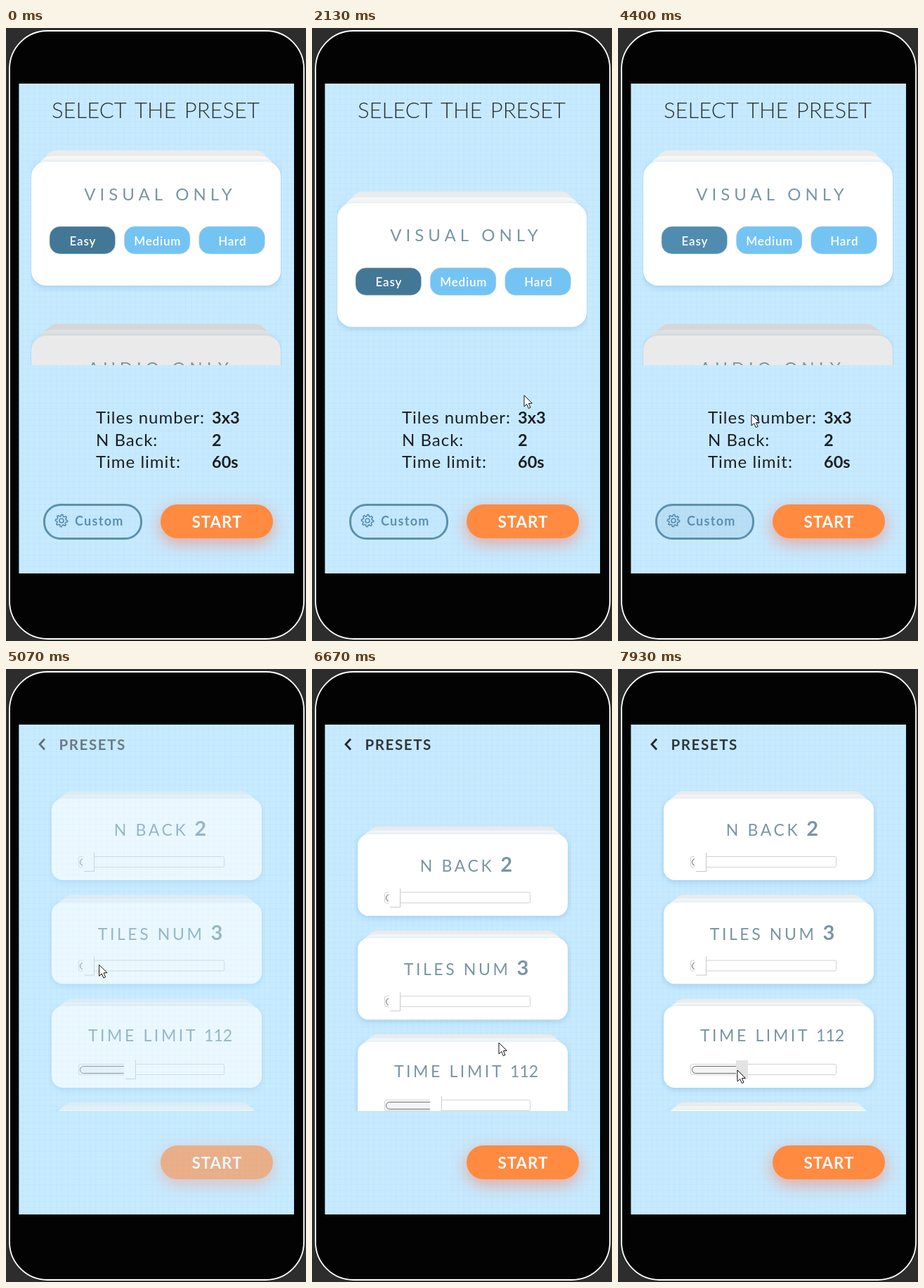
Write an HTML page with a canvas that moves like this. It is 427 by 871 pixels and loops after 8 s.

```html
<!DOCTYPE html>
<html lang="en">
<head>
<meta charset="utf-8">
<title>Preset picker</title>
<style>
  html, body { margin: 0; width: 100%; height: 100%; overflow: hidden; background: #2d2d2d; }
  canvas { display: block; width: 427px; height: 871px; }
</style>
</head>
<body>
<canvas id="stage"></canvas>
<script>
const LOOP = 8000, STEP = 1000 / 15;
const canvas = document.getElementById('stage');
const ctx = canvas.getContext('2d');
const ratio = window.devicePixelRatio || 1;
canvas.width = 427 * ratio;
canvas.height = 871 * ratio;

const FAMILY = 'Lato, "Open Sans", sans-serif';
const LABEL = '#7896a5', STEEL = '#5b90b0', INK = '#1c1f22';
const LIGHT_BUTTON = [116, 196, 243], DARK_BUTTON = [67, 119, 150];

// Places where the hand turns or rests; it eases from one to the next.
const pointerStops = [
  { t: 800, x: 400, y: 696 },
  { t: 1670, x: 315, y: 278 },
  { t: 2270, x: 300, y: 559 },
  { t: 2930, x: 231, y: 309 },
  { t: 3530, x: 118, y: 302 },
  { t: 4130, x: 130, y: 694 },
  { t: 4400, x: 190, y: 549 },
  { t: 5200, x: 128, y: 410 },
  { t: 5600, x: 128, y: 308 },
  { t: 6670, x: 266, y: 531 },
  { t: 7670, x: 304, y: 221 },
  { t: 7930, x: 170, y: 570 }
];
const presetDrag = { press: 1386, release: 2300, from: 382 };
const optionDrag = { press: 5200, release: 6800, from: 410 };

function ramp(time, start, end) {
  const k = Math.min(1, Math.max(0, (time - start) / (end - start)));
  return k * k * (3 - 2 * k);
}

function pointerAt(time) {
  let { x, y } = pointerStops[0];
  pointerStops.slice(1).forEach((stop, i) => {
    const k = ramp(time, pointerStops[i].t, stop.t);
    x += (stop.x - pointerStops[i].x) * k;
    y += (stop.y - pointerStops[i].y) * k;
  });
  return { x, y };
}

// The list follows the hand, resists past its top, and springs back on release.
function scrollAt(time, { press, release, from }) {
  if (time < press) return 0;
  const pulled = pointerAt(Math.min(time, release)).y - from;
  const settle = Math.exp(-Math.max(0, time - release) / 90);
  return (pulled > 0 ? pulled * .42 : pulled) * settle;
}

const mix = (a, b, k) => `rgb(${a.map((v, i) => Math.round(v + (b[i] - v) * k))})`;

function box(x, y, w, h, r, fill, stroke, line = 1) {
  ctx.beginPath();
  ctx.roundRect(x, y, w, h, r);
  if (fill) { ctx.fillStyle = fill; ctx.fill(); }
  if (stroke) { ctx.strokeStyle = stroke; ctx.lineWidth = line; ctx.stroke(); }
}

function shadowed(color, blur, offset, draw) {
  ctx.shadowColor = color;
  ctx.shadowBlur = blur * ratio;
  ctx.shadowOffsetY = offset * ratio;
  draw();
  ctx.shadowColor = 'transparent';
}

// Returns the advance width.
function write(text, x, y, size, { weight = 400, color = INK, gap = 0, wordGap = 0, center = false } = {}) {
  ctx.font = `${weight} ${size}px ${FAMILY}`;
  ctx.letterSpacing = gap + 'px';
  ctx.wordSpacing = wordGap + 'px';
  ctx.textAlign = center ? 'center' : 'left';
  ctx.fillStyle = color;
  ctx.fillText(text, x + (center ? gap / 2 : 0), y);
  return ctx.measureText(text).width;
}

function line(points, color, width) {
  ctx.beginPath();
  points.forEach(([x, y]) => ctx.lineTo(x, y));
  ctx.strokeStyle = color;
  ctx.lineWidth = width;
  ctx.stroke();
}

function clipped(x, y, w, h, draw) {
  ctx.save();
  ctx.beginPath();
  ctx.rect(x, y, w, h);
  ctx.clip();
  draw();
  ctx.restore();
}

function phone() {
  ctx.fillStyle = '#2d2d2d';
  ctx.fillRect(0, 0, 427, 871);
  box(5, 4, 419, 864, 54, '#030303', '#fff', 1.8);
}

function paper() {
  ctx.fillStyle = '#c8eaff';
  ctx.fillRect(18, 79, 392, 696);
  ctx.fillStyle = 'rgba(170, 216, 245, .16)';
  for (let x = 23; x < 410; x += 8) ctx.fillRect(x, 79, 2, 696);
  for (let y = 84; y < 775; y += 8) ctx.fillRect(18, y, 392, 2);
}

function startButton() {
  shadowed('rgba(255, 120, 85, .6)', 24, 7, () => box(220, 677, 160, 48, 24, '#ff8a40'));
  write('START', 300, 710, 22.5, { weight: 700, color: '#fff', gap: .9, center: true });
}

function cardStack(x, y, w, h, r, rise, [back, mid, front]) {
  box(x + r * .8, y - rise, w - r * 1.6, 50, r, back);
  box(x + r * .4, y - rise / 2, w - r * .8, 50, r, mid);
  shadowed('rgba(90, 165, 215, .4)', 8, 2, () => box(x, y, w, h, r, front));
}

const WHITE_STACK = ['#ebebeb', '#f8f8f8', '#fff'], GREY_STACK = ['#d6d6d6', '#e1e1e1', '#eaeaea'];

function presetCard(y, title, shades) {
  cardStack(36, y, 355, 176, 21, 16.5, shades ? WHITE_STACK : GREY_STACK);
  write(title, 216.5, y + 54.5, 24, { color: LABEL, gap: 6, center: true });
  ['Easy', 'Medium', 'Hard'].forEach((name, i) => {
    const x = 62 + i * 106.4;
    box(x, y + 92, 93.5, 39, 15, shades ? mix(LIGHT_BUTTON, DARK_BUTTON, shades[i]) : '#b2c7d5', 'rgba(190, 205, 215, .5)');
    write(name, x + 47, y + 118.5, 17, { weight: 600, color: '#fff', gap: .8, center: true });
  });
}

function gear(cx, cy) {
  ctx.beginPath();
  for (let i = 0; i < 32; i++) {
    const r = i % 4 < 2 ? 8.6 : 6.4, a = i * Math.PI / 16;
    ctx.lineTo(cx + r * Math.cos(a), cy + r * Math.sin(a));
  }
  ctx.closePath();
  ctx.strokeStyle = STEEL;
  ctx.lineWidth = 1.7;
  ctx.stroke();
  ctx.beginPath();
  ctx.arc(cx, cy, 3, 0, 7);
  ctx.stroke();
}

function presetScreen(time) {
  write('SELECT THE PRESET', 213, 128, 31, { weight: 300, color: '#2b3237', wordGap: 3, center: true });
  const easy = 1 - ramp(time, 2870, 3130) + .73 * ramp(time, 3500, 3700);
  const medium = ramp(time, 2800, 3070) - ramp(time, 3500, 3700);
  clipped(35, 170, 357, 309, () => {
    const scroll = scrollAt(time, presetDrag);
    presetCard(190 + scroll, 'VISUAL ONLY', [easy, medium, 0]);
    presetCard(437 + scroll, 'AUDIO ONLY');
  });
  const values = medium > .6 ? ['4x4', '2', '90s'] : ['3x3', '2', '60s'];
  ['Tiles number:', 'N Back:', 'Time limit:'].forEach((name, i) => {
    const y = 562 + i * 31.5;
    write(name, 128, y, 24, { gap: 1 });
    write(values[i], 293, y, 23.5, { weight: 700 });
  });
  box(54.5, 677.5, 138, 48, 23, `rgba(81, 139, 174, ${.02 + .1 * ramp(time, 3900, 4100)})`, STEEL, 3);
  gear(79, 700);
  write('Custom', 98, 707, 18, { weight: 700, color: STEEL, gap: 1.3 });
  startButton();
}

function optionCard(y, { label, value, level, big }, pressed) {
  cardStack(65, y, 299, 116, 16, 10.5, WHITE_STACK);
  const base = y + (big ? 53 : 50);
  const labelStyle = { color: LABEL, gap: 3.6 }, valueStyle = { color: LABEL, weight: big ? 700 : 400 };
  const valueSize = big ? 29 : 23, between = 9;
  // Measure both parts off stage, then centre them together.
  const width = write(label, -999, 0, 23, labelStyle) + between + write(value, -999, 0, valueSize, valueStyle);
  const left = 219.5 - width / 2;
  const advance = write(label, left, base, 23, labelStyle);
  write(value, left + advance + between, base, valueSize, valueStyle);

  const thumb = 109 + 190 * level, top = y + 77;
  box(103.5, y + 82.5, 207, 15, 2, '#fff', '#d2d2d2');
  box(105.5, y + 85.5, thumb - 98, 10, 5, '#f4f4f4', '#666');
  ctx.fillStyle = pressed ? '#e3e3e3' : '#fff';
  ctx.fillRect(thumb, top, 17, 27);
  if (!pressed) line([[thumb + 16.5, top], [thumb + 16.5, top + 26.5], [thumb + 2, top + 26.5]], '#c8c8c8', 1);
}

const options = [
  { label: 'N BACK', value: '2', level: 0, big: true },
  { label: 'TILES NUM', value: '3', level: 0, big: true },
  { label: 'TIME LIMIT', value: '112', level: .31 },
  { label: 'TURN TIME', value: '1', level: .61 }
];

function optionScreen(time) {
  line([[55, 99.5], [48, 107], [55, 114.5]], '#23282c', 2.8);
  write('PRESETS', 75.5, 114.5, 20.5, { weight: 700, color: '#2f383e', gap: 1.6 });
  clipped(60, 166, 309, 462, () => {
    const scroll = scrollAt(time, optionDrag);
    options.forEach((option, i) => optionCard(184 + i * 147.5 + scroll, option, i === 2 && time > 7900));
  });
  startButton();
}

function arrow({ x, y }) {
  const shape = [[0, 0], [0, 16], [3.7, 12.6], [6.3, 18.6], [9, 17.4], [6.4, 11.6], [11.3, 11.3]];
  ctx.beginPath();
  shape.forEach(([dx, dy]) => ctx.lineTo(x + dx, y + dy));
  ctx.closePath();
  ctx.fillStyle = '#fff';
  ctx.fill();
  ctx.strokeStyle = '#111';
  ctx.lineWidth = 1;
  ctx.stroke();
}

function render(time) {
  ctx.setTransform(ratio, 0, 0, ratio, 0, 0);
  phone();
  clipped(18.4, 79, 391.6, 696, () => {
    paper();
    (time < 4750 ? presetScreen : optionScreen)(time);
    // Both screens fade through the empty paper.
    ctx.globalAlpha = ramp(time, 4430, 4730) - ramp(time, 4770, 5270);
    paper();
    ctx.globalAlpha = 1;
    if (time >= 799) arrow(pointerAt(time));
  });
}

const begin = performance.now();
function tick() {
  const elapsed = (performance.now() - begin) % LOOP;
  // The picture advances fifteen times a second.
  render(Math.floor(elapsed / STEP + .1) * STEP);
  requestAnimationFrame(tick);
}
tick();
</script>
</body>
</html>
```
